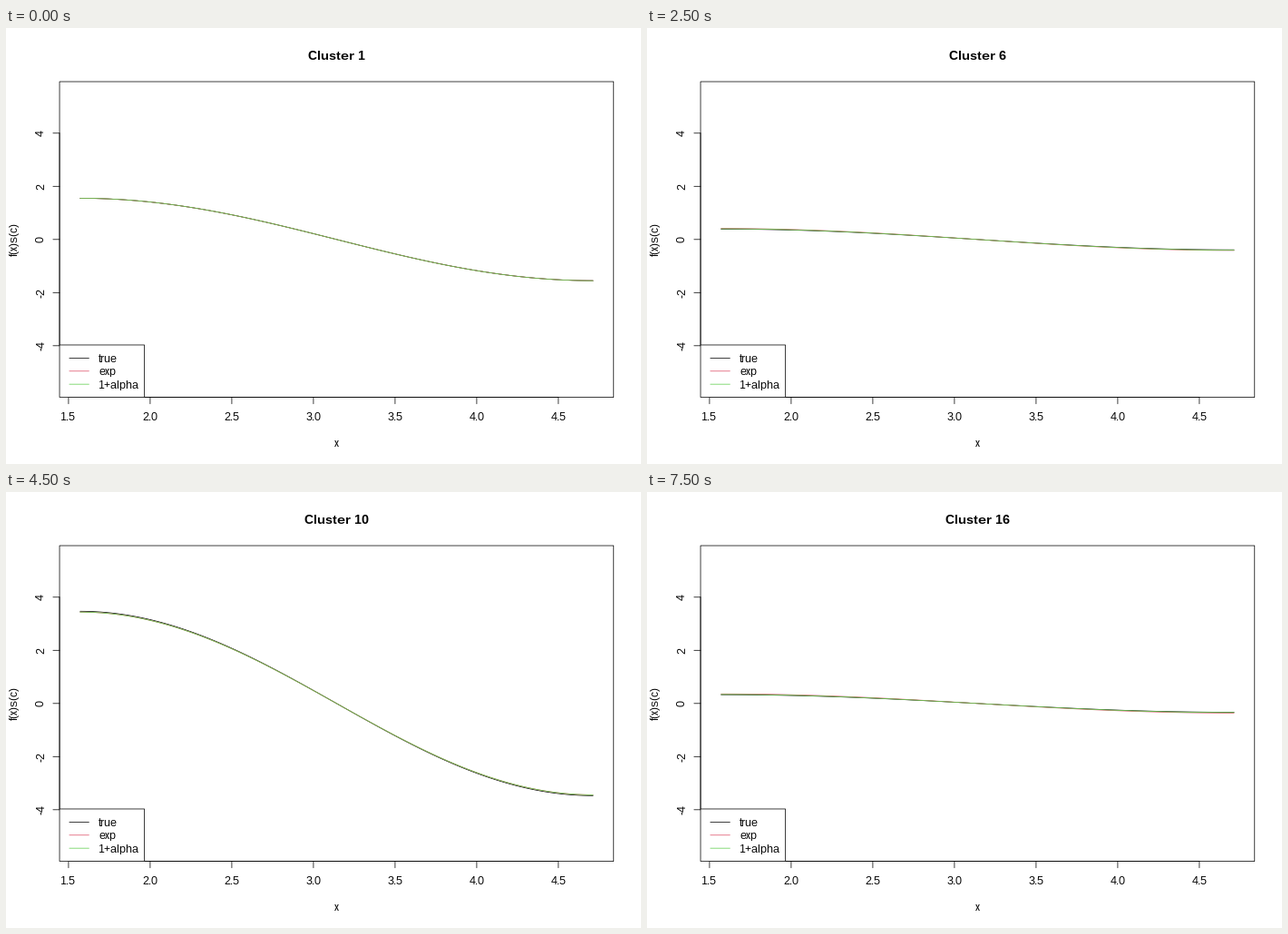
A matplotlib script that plays this animation: 700 px wide and 480 px high, repeating every 8000 ms.

```python
import numpy as np
import matplotlib.pyplot as plt
from matplotlib.animation import FuncAnimation
from matplotlib.patches import Rectangle

plt.rcParams.update({
    "font.family": "Liberation Sans",
    "text.hinting": "default",
    "text.hinting_factor": 1,
    "path.snap": False,
    "path.simplify": False,
})

W, H, DPI = 700, 480, 100
PT = 72 / DPI
LW = 0.75 * PT
LEFT, RIGHT, TOP, BOTTOM = 59.04, 669.76, 59.04, 406.56
MID_X, MID_Y = (LEFT + RIGHT) / 2, (TOP + BOTTOM) / 2
SERIES = {"true": "black", "exp": "#DF536B", "1+alpha": "#61D04F"}

# True scale s(c) of each cluster
SCALES = [1.55, .55, .74, 1.34, .45, .39, 1.73, .13,
          2.2, 3.47, 2.4, 1.71, 1, .8, 1.34, .33]


def px(x):
    return MID_X + (x - np.pi) * (RIGHT - LEFT) / (1.08 * np.pi)


def py(y):
    return MID_Y - y * (BOTTOM - TOP) / (1.08 * 11)


def estimates(i):
    """True scale and its two fits, which miss most when it is small."""
    s = SCALES[i]
    fit = s * (1 - 0.001 * i)
    return s, fit + 0.26 * np.exp(-6 * s), fit + 0.03 * np.exp(-2 * s)


fig = plt.figure(figsize=(W / DPI, H / DPI), dpi=DPI, facecolor="white")
ax = fig.add_axes([0, 0, 1, 1])
ax.set_xlim(0, W)
ax.set_ylim(H, 0)
ax.axis("off")


def line(xs, ys, color="black", z=2):
    return ax.plot(xs, ys, color=color, lw=LW, zorder=z,
                   solid_capstyle="round", solid_joinstyle="round")[0]


def box(x0, y0, x1, y1, fill, z):
    return ax.add_patch(Rectangle((x0, y0), x1 - x0, y1 - y0, facecolor=fill,
                                  edgecolor="black", lw=LW, zorder=z))


def label(x, y, s, size=12, ha="center", **kw):
    return ax.text(x, y, s, fontsize=size * PT, ha=ha, va="baseline",
                   rotation_mode="anchor", zorder=6, **kw)


curves = [line([], [], c) for c in SERIES.values()]

frame = box(LEFT, TOP, RIGHT, BOTTOM, "none", 2)

x_ticks = np.arange(1.5, 4.6, 0.5)
line(px(x_ticks[[0, -1]]), [BOTTOM] * 2)
for t in x_ticks:
    line([px(t)] * 2, [BOTTOM, BOTTOM + 7.2])
    label(px(t), 432, f"{t:.1f}")

y_ticks = np.arange(-4, 5, 2)
line([LEFT] * 2, py(y_ticks[[0, -1]]))
for t in y_ticks:
    line([LEFT - 7.2, LEFT], [py(t)] * 2)
    label(42, py(t), str(t), rotation=90)

label(MID_X, 461, "x")
label(13, MID_Y, "f(x)s(c)", rotation=90)

# The legend is cut softly at the plot edge
legend = box(LEFT, BOTTOM - 57.6, 152.6, BOTTOM, "white", 4)
legend.set_clip_path(frame.get_path(), frame.get_transform())
for i, (name, color) in enumerate(SERIES.items()):
    y = BOTTOM - 43.2 + 14.4 * i
    line([69.84, 91.44], [y, y], color, 5)
    label(102.2, round(y + 4.4), name, ha="left")

title = label(MID_X, 35, "", 14.4, weight="bold")

xs = np.linspace(np.pi / 2, 3 * np.pi / 2, 100)


def update(i):
    title.set_text(f"Cluster {i + 1}")
    for curve, amp in zip(curves, estimates(i)):
        curve.set_data(px(xs), py(amp * np.sin(xs)))
    return [title, *curves]


anim = FuncAnimation(fig, update, frames=len(SCALES), interval=500,
                     repeat=True, repeat_delay=0, blit=False)
plt.show()
```
